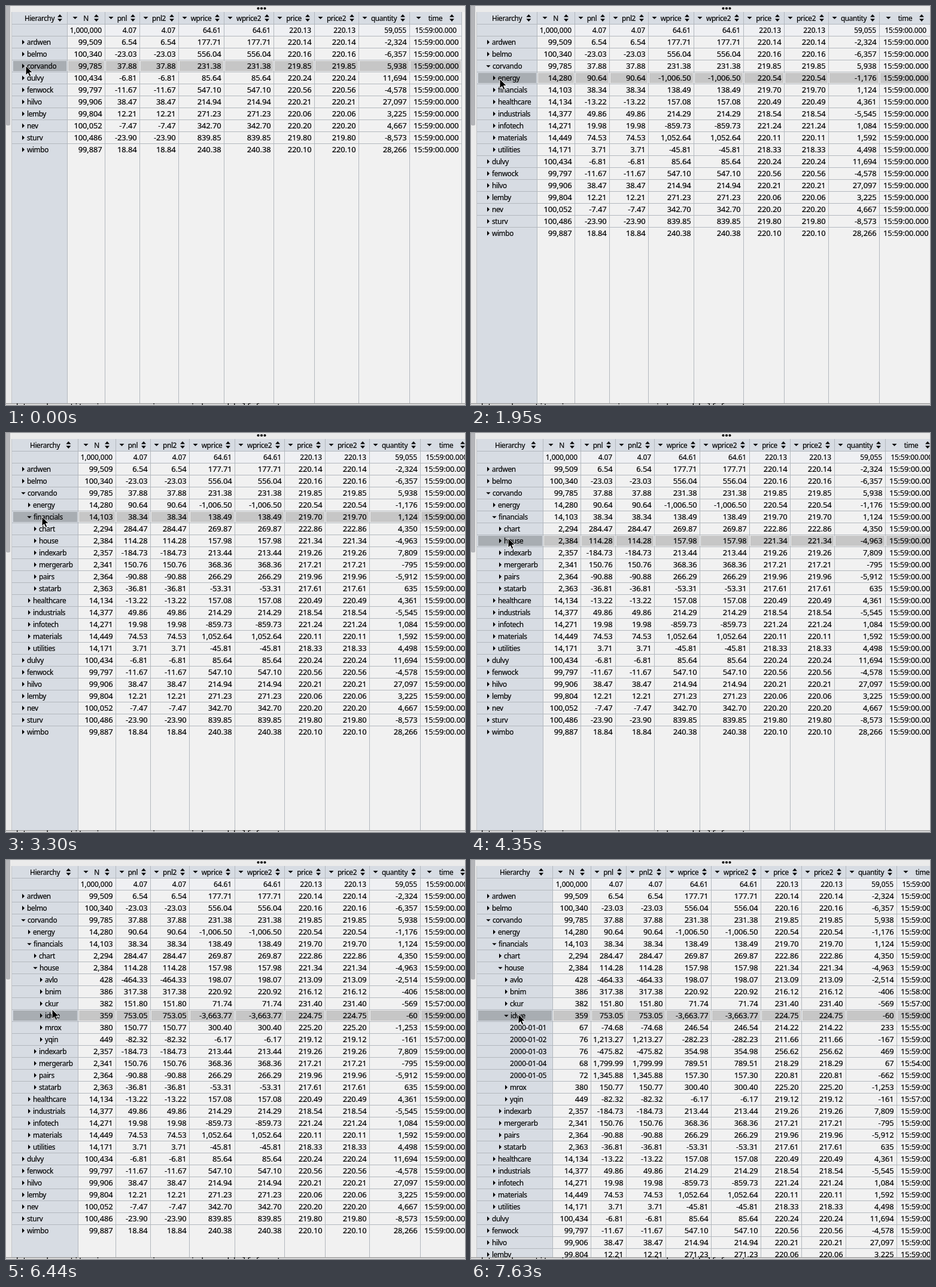
Animation, 767 px wide and 668 px high, one loop 8000 ms. Source, as an HTML page:

```html
<!DOCTYPE html>
<html lang="en">
<head>
<meta charset="utf-8">
<title>Hierarchy table</title>
<style>
html, body { margin: 0; width: 100%; height: 100%; overflow: hidden; background: #ebebeb; }
svg { display: block; }
text { font-family: "Noto Sans", "Open Sans", sans-serif; fill: #000; stroke: #000; stroke-width: .18px; white-space: pre; }
.label, .head { font-size: 11.8px; letter-spacing: -.35px; }
.num, .sum, .date { letter-spacing: -.15px; }
.num { font-size: 13px; }
.sum, .date { font-size: 12px; }
.num, .sum { text-anchor: end; }
.head { text-anchor: middle; }
.mono { font: 12px "Noto Sans Mono", monospace; }
rect { shape-rendering: crispEdges; }
</style>
</head>
<body>
<svg id="stage" width="767" height="668" viewBox="0 0 767 668">
  <rect width="767" height="668" fill="#ebebeb"/>
  <rect y="-10" width="7" height="210" rx="3" fill="#b4b5b9"/>
  <rect x="9" y="10" width="1" height="656" fill="#c4c6c9"/>
  <g><circle cx="421.5" cy="4" r="2.1"/><circle cx="427" cy="4" r="2.1"/><circle cx="432.5" cy="4" r="2.1"/></g>
  <g id="table"></g>
  <rect y="665" width="767" height="1" fill="#8e8e8e"/>
  <rect y="666" width="767" height="2" fill="#d9d9d9"/>
  <text class="mono" x="13" y="675">data and quantity views are running over index and half format</text>
  <path id="cursor" d="M0 0V16L3.7 12.6 6.2 18.2 8.9 17 6.5 11.6H11.4Z" fill="#000" stroke="#fff"/>
</svg>
<script>
// Each line: name, N, pnl, wprice, price, quantity, minute.
// A bare name is a group, totalled from the next level.
const levels = [`
  ardwen 99509 6.54 177.71 220.14 -2324
  belmo 100340 -23.03 556.04 220.16 -6357
  corvando
  dulvy 100434 -6.81 85.64 220.24 11694
  fenwock 99797 -11.67 547.1 220.56 -4578
  hilvo 99906 38.47 214.94 220.21 27097
  lemby 99804 12.21 271.23 220.06 3225
  nev 100052 -7.47 342.7 220.2 4667
  sturv 100486 -23.9 839.85 219.8 -8573
  wimbo 99887 18.84 240.377 220.1 28266`, `
  energy 14280 90.64 -1006.5 220.54 -1176
  financials
  healthcare 14134 -13.22 157.08 220.49 4361
  industrials 14377 49.86 214.29 218.54 -5545
  infotech 14271 19.98 -859.73 221.24 1084
  materials 14449 74.53 1052.64 220.11 1592
  utilities 14171 3.71 -45.806 218.33 4498`, `
  chart 2294 284.47 269.87 222.86 4350
  house
  indexarb 2357 -184.73 213.443 219.26 7809
  mergerarb 2341 150.76 368.36 217.21 -795
  pairs 2364 -90.88 266.29 219.96 -5912
  statarb 2363 -36.81 -53.31 217.61 635`, `
  avlo 428 -464.33 198.07 213.09 -2514
  bnim 386 317.38 220.92 216.12 -406 58
  ckur 382 151.8 71.74 231.4 -569 57
  idwe
  mrox 380 150.77 300.4 225.2 -1253
  yqin 449 -82.32 -6.17 219.12 -161 57`, `
  2000-01-01 67 -74.68 246.54 214.22 233 55
  2000-01-02 76 1213.27 -282.23 211.66 -167
  2000-01-03 76 -475.82 354.98 256.62 469
  2000-01-04 68 1799.99 789.51 218.29 67 54
  2000-01-05 72 1345.88 157.3 220.81 -662`].map(parse);

function parse(block, level) {
  return block.trim().split('\n').map(line => {
    const [name, ...v] = line.trim().split(/\s+/);
    const [n, pnl, wprice, price, qty, min = 59] = v.map(Number);
    return { name, level, group: !v.length, n, pnl, wprice, price, qty, min };
  });
}

const sum = (rows, f) => rows.reduce((acc, row) => acc + f(row), 0);
const mean = (rows, key, weight) => sum(rows, r => r[key] * r[weight]) / sum(rows, r => r[weight]);
const totals = rows => ({
  n: sum(rows, r => r.n),
  pnl: mean(rows, 'pnl', 'n'),
  wprice: mean(rows, 'wprice', 'qty'),
  price: mean(rows, 'price', 'n'),
  qty: sum(rows, r => r.qty),
  min: Math.max(...rows.map(r => r.min))
});

for (let i = levels.length - 2; i >= 0; i--) {
  Object.assign(levels[i].find(row => row.group), totals(levels[i + 1]));
}
const grand = totals(levels[0]);

const format = (v, digits) => v.toLocaleString('en-US', { minimumFractionDigits: digits, maximumFractionDigits: digits });
function cells({ n, pnl, wprice, price, qty, min }) {
  const pairs = [pnl, pnl, wprice, wprice, price, price].map(v => format(v, 2));
  return [format(n, 0), ...pairs, format(qty, 0), `15:${min}:00.000`];
}

const heads = ['N', 'pnl', 'pnl2', 'wprice', 'wprice2', 'price', 'price2', 'quantity', 'time'];
const widths = [63, 58, 65, 76, 83, 68, 74, 85, 87];
const treeWidth = [92, 100, 110, 110, 126];   // by number of open levels
const left = 10, bottom = 665, rowH = 20;

const rect = (x, y, w, h, fill) => `<rect x="${x}" y="${y}" width="${w}" height="${h}" fill="${fill}"/>`;
const text = (cls, x, y, s) => `<text class="${cls}" x="${x}" y="${y}">${s}</text>`;
const down = (x, y, r = 4) => `<path d="M${x - r} ${y - r / 2}h${2 * r}l${-r} ${r}z"/>`;
const right = (x, y) => `<path d="M${x - 2} ${y - 4}v8l4 -4z"/>`;
const sorter = (x, y) => `<path d="M${x - 4} ${y - 1.5}h8l-4 -4.5zM${x - 4} ${y + 1.5}h8l-4 4.5z"/>`;

function visibleRows(depth, level = 0) {
  return levels[level].flatMap(row => {
    const open = row.group && level < depth;
    return open ? [{ ...row, open }, ...visibleRows(depth, level + 1)] : [row];
  });
}

function columnEdges(depth) {
  const xs = [left + treeWidth[depth]];
  const extra = c => depth === 4 && c < 3 ? 1 : 0;   // room for the longer values
  widths.forEach((w, c) => xs.push(xs[c] + w + extra(c)));
  return xs;
}

function drawGrid(xs, count, hover) {
  const end = xs[9], tall = bottom - left, line = '#b3b8be';
  let out = rect(left, left, 757, tall, '#f1f1f1')
    + rect(left, 30, end - left, 20, '#eff0f3')
    + rect(left, left, end - left, 20, '#d7dce3')
    + rect(left, left, xs[0] - left, tall, '#d7dce3');
  for (let i = -1; i < count; i++) out += rect(left, 50 + i * rowH, end - left, 1, line);
  for (const x of xs) out += rect(x, left, 1, tall, line);

  const y = 52 + hover * rowH;
  out += rect(12, y, xs[0] - 13, 17, '#a8adb2');
  for (let c = 0; c < 9; c++) out += rect(xs[c] + 2, y, xs[c + 1] - xs[c] - 3, 17, '#c6c6c6');
  return out;
}

function drawHeads(xs) {
  const grow = xs[0] - left - treeWidth[0];
  let out = text('label', 31 + grow / 2, 24.5, 'Hierarchy') + sorter(90 + grow * .8, 20);
  const sums = cells(grand);
  heads.forEach((name, c) => {
    const a = xs[c], b = xs[c + 1], pad = name === 'N' ? 3 : name === 'time' ? 5 : 0;
    out += down(a + 10.5 + pad, 20) + text('head', (a + b) / 2, 24.5, name) + sorter(b - 11 - pad, 20);
    out += text('sum', b - (name === 'time' ? 8 : 5), 45, sums[c]);
  });
  return out;
}

function drawRow(row, i, xs) {
  const y = 60 + i * rowH, x = 35 + row.level * 10;
  let out = '';
  if (row.level === 4) out += text('date', x - 10, y + 4.5, row.name);
  else {
    out += row.open ? down(x - 6, y + 1, 3.7) : right(x - 6, y + .5);
    out += text('label', x + (row.open ? 1 : 0), y + 4.5, row.name);
  }
  cells(row).forEach((v, c) => out += text('num', xs[c + 1] - 4.5, y + 5, v));
  return out;
}

function drawTable(depth, hover) {
  const xs = columnEdges(depth), rows = visibleRows(depth);
  return drawGrid(xs, rows.length, hover) + drawHeads(xs) + rows.map((row, i) => drawRow(row, i, xs)).join('');
}

const loop = 8000, tick = 150;
const clicks = [1350, 3300, 5240, 7630];
const hovers = [[0, 2], [1950, 3], [2250, 4], [4200, 6], [6290, 7], [6440, 10]];
const easeOut = p => 1 - (1 - p) ** 2;
const easeInOut = p => p ** 3 * (10 - 15 * p + 6 * p * p);
const moves = [
  { at: 1950, ticks: 3, to: [60, 140], ease: easeOut },
  { at: 3900, ticks: 4, to: [62, 176], ease: easeInOut },
  { at: 6140, ticks: 4, to: [79, 258], ease: easeInOut }
];

// The pointer is seen only once per tick while it travels.
function pointer(t) {
  let pos = [33, 100];
  for (const { at, ticks, to, ease } of moves) {
    if (t < at) break;
    const p = ease(Math.min(1, (Math.floor((t - at) / tick) + 1) / ticks));
    pos = pos.map((v, i) => v + (to[i] - v) * p);
  }
  return pos.map(Math.round);
}

const table = document.getElementById('table');
const cursor = document.getElementById('cursor');
let shown = '';

function draw(t) {
  const depth = clicks.filter(at => at <= t).length;
  const hover = hovers.findLast(([at]) => at <= t)[1];
  const key = depth + ':' + hover;
  if (key !== shown) {
    table.innerHTML = drawTable(depth, hover);
    shown = key;
  }
  cursor.setAttribute('transform', `translate(${pointer(t).join(' ')})`);
}

const start = performance.now();
function run() {
  draw((performance.now() - start) % loop);
  requestAnimationFrame(run);
}
run();
</script>
</body>
</html>
```
